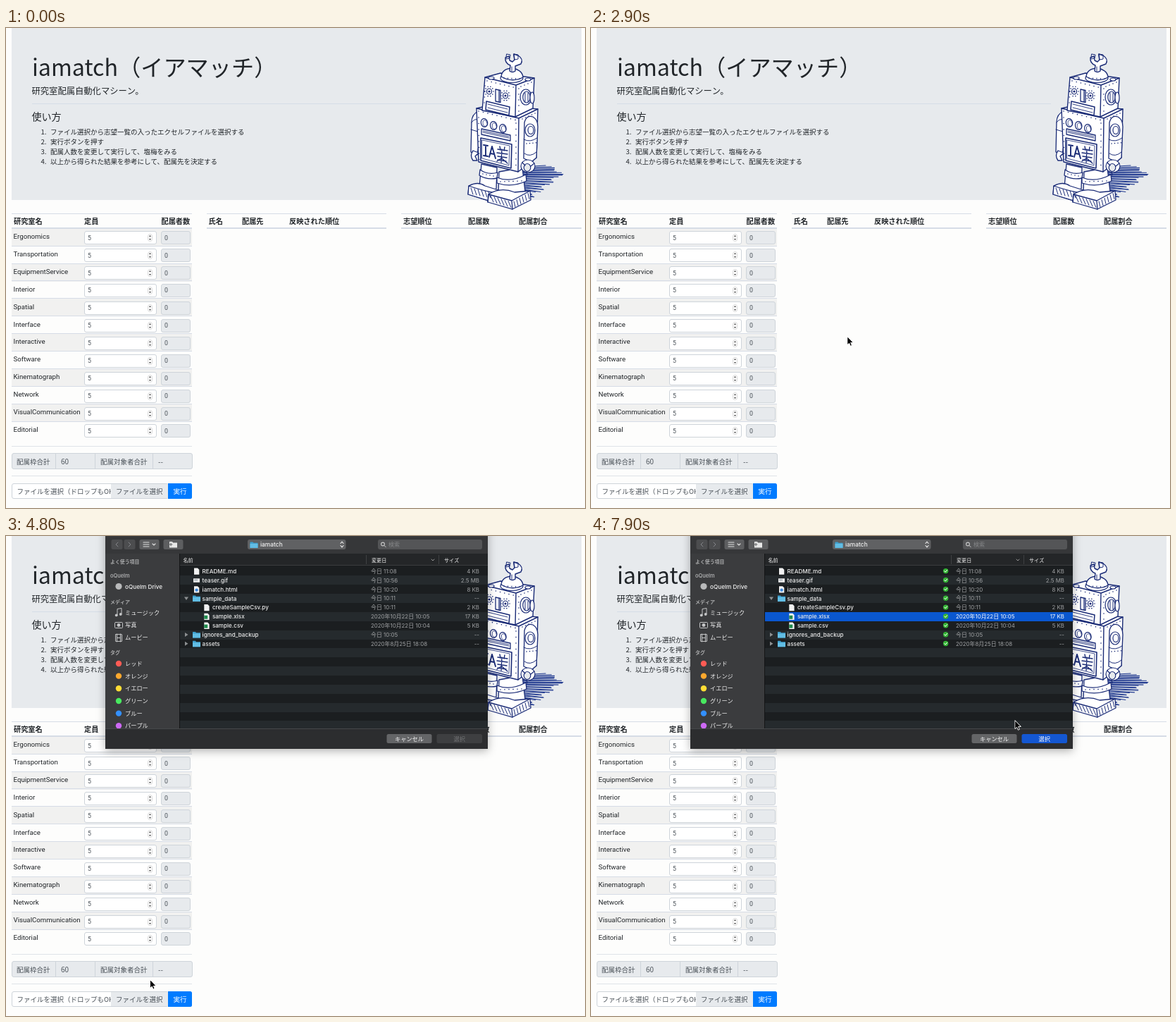
An HTML page with a canvas that plays this animation: 822x681 px, repeating every 8000 ms.

```html
<!DOCTYPE html>
<html lang="ja">
<head>
<meta charset="utf-8">
<title>iamatch</title>
<style>
html, body { margin: 0; width: 100%; height: 100%; overflow: hidden; background: #fdfdfc; }
canvas { display: block; }
</style>
</head>
<body>
<canvas id="stage" width="822" height="681"></canvas>
<script>
const ctx = document.getElementById('stage').getContext('2d');
const LOOP = 8000, STEP = 100;
const JP = '"Noto Sans CJK JP", "Noto Sans CJK", sans-serif';
const LATIN = 'Roboto, "Noto Sans CJK JP", "Noto Sans CJK", sans-serif';
const MAC = 'Inter, "Noto Sans CJK JP", "Noto Sans CJK", sans-serif';
const INK = '#212529', BORDER = '#ced4da', GRAY = '#e7eaed', RULE = '#d6dce6', NAVY = '#1a2b76';

const smooth = u => { u = Math.max(0, Math.min(1, u)); return u * u * (3 - 2 * u); };

function rect(x, y, w, h, fill) {
  ctx.fillStyle = fill;
  ctx.fillRect(x, y, w, h);
}

function box(x, y, w, h, r, fill, line) {
  ctx.beginPath();
  ctx.roundRect(x, y, w, h, r);
  if (fill) { ctx.fillStyle = fill; ctx.fill(); }
  if (line) { ctx.strokeStyle = line; ctx.lineWidth = 1; ctx.stroke(); }
}

function disc(x, y, r, fill) {
  ctx.beginPath();
  ctx.arc(x, y, r, 0, 7);
  ctx.fillStyle = fill;
  ctx.fill();
}

function draw(d, fill, line, width = 1) {
  const p = new Path2D(d);
  if (fill) { ctx.fillStyle = fill; ctx.fill(p); }
  if (line) { ctx.strokeStyle = line; ctx.lineWidth = width; ctx.stroke(p); }
}

// cy is the optical middle of the line
function text(s, x, cy, size, { font = JP, weight = 400, color = INK, align = 'left' } = {}) {
  ctx.font = `${weight} ${size}px ${font}`;
  ctx.fillStyle = color;
  ctx.textAlign = align;
  ctx.fillText(s, x, cy + size * 0.37);
}

/* ---------- page ---------- */

const labs = ['Ergonomics', 'Transportation', 'EquipmentService', 'Interior', 'Spatial', 'Interface',
  'Interactive', 'Software', 'Kinematograph', 'Network', 'VisualCommunication', 'Editorial'];
const steps = ['ファイル選択から志望一覧の入ったエクセルファイルを選択する', '実行ボタンを押す',
  '配属人数を変更して実行して、塩梅をみる', '以上から得られた結果を参考にして、配属先を決定する'];

function intro() {
  rect(8, 0, 809, 244, GRAY);
  text('iamatch（イアマッチ）', 37, 56.5, 32.2);
  text('研究室配属自動化マシーン。', 36.5, 89, 12.3);
  rect(37, 107, 616, 1, '#d5dde6');
  text('使い方', 36.5, 126.2, 14);
  steps.forEach((s, i) => {
    const y = 147 + i * 14.2;
    text(i + 1 + '.', 57.5, y, 9.5, { align: 'right' });
    text(s, 63, y, 9.5);
  });
}

function tableHead(x, w, cells) {
  rect(x, 263, w, 1, RULE);
  rect(x, 283, w, 2, RULE);
  for (const [s, cx] of cells) text(s, cx, 274, 10.2, { weight: 700 });
}

function labTable() {
  tableHead(8, 256, [['研究室名', 11], ['定員', 111], ['配属者数', 220.5]]);
  labs.forEach((name, i) => {
    const y = 284.7 + i * 24.93, mid = y + 12.5;
    if (i % 2 === 0) rect(8, Math.round(y), 256, 25, '#f1f1f0');
    if (i) rect(8, Math.round(y - 1), 256, 1, RULE);
    text(name, 10.5, mid - 1.9, 9.7, { font: LATIN });
    const top = Math.round(mid - 9) + 0.5;
    box(111.5, top, 102, 18, 2.5, '#fff', BORDER);
    text('5', 116, mid + 0.2, 8.8, { font: LATIN, color: '#495057' });
    box(201.5, top + 4, 6, 10, 3, '#fff', '#d8d8d8');
    draw(`M202.8 ${top + 7.6}l1.7 -2 1.7 2zM202.8 ${top + 10.4}l1.7 2 1.7 -2z`, '#555');
    box(220.5, top, 41, 18, 2.5, GRAY, BORDER);
    text('0', 225, mid + 0.2, 8.8, { font: LATIN, color: '#495057' });
  });
}

function controls() {
  rect(8, 593, 256, 1, '#dfe3e8');
  rect(8, 635, 256, 1, '#dfe3e8');
  box(8.5, 603.5, 256, 22, 2.5, GRAY, BORDER);
  for (const x of [70, 126, 208]) rect(x, 604, 1, 22, BORDER);
  const soft = { color: '#495057' };
  text('配属枠合計', 15, 615, 9.5, soft);
  text('60', 78, 615, 10, soft);
  text('配属対象者合計', 134, 615, 9.5, soft);
  text('--', 216, 615, 10, soft);

  box(8.5, 646.5, 222, 21, 2.5, '#fff', BORDER);
  ctx.save();
  ctx.beginPath();
  ctx.rect(8, 640, 140.5, 34);
  ctx.clip();
  text('ファイルを選択（ドロップもOK）', 15.5, 657, 9.5, soft);
  ctx.restore();
  rect(149, 647, 81, 20, GRAY);
  text('ファイルを選択', 156, 657, 9.5, soft);
  box(230, 646, 34, 22, [0, 2.5, 2.5, 0], '#007bff');
  text('実行', 237.5, 657, 9.5, { color: '#fff', weight: 500 });
}

/* ---------- robot ---------- */

function oval(x, y, rx, ry, fill = '#fff', tilt = 0, width = 1.2) {
  ctx.beginPath();
  ctx.ellipse(x, y, rx, ry, tilt, 0, 7);
  if (fill) { ctx.fillStyle = fill; ctx.fill(); }
  ctx.strokeStyle = NAVY;
  ctx.lineWidth = width;
  ctx.stroke();
}

function part(d, width = 1.3, fill = '#fff') { draw(d, fill, NAVY, width); }

function rivets(x, y, dx, dy, n) {
  for (let i = 0; i < n; i++) disc(x + dx * i, y + dy * i, 0.8, NAVY);
}

function shadow() {
  ctx.strokeStyle = '#20398f';
  ctx.lineWidth = 1.1;
  for (let i = 0; i < 27; i++) {
    const y = 193 + i * 1.75, u = i / 26;
    const jitter = Math.sin(i * 7.3) * 5;
    const end = i < 6 ? 766 + i * 4 : 790 - (u - 0.22) * 58;
    ctx.beginPath();
    ctx.moveTo(730, y + 4 - u * 7);
    ctx.lineTo(end + jitter, y + 2 + Math.sin(i * 3.1));
    ctx.stroke();
  }
}

function robot() {
  ctx.lineJoin = ctx.lineCap = 'round';
  shadow();

  // legs and feet
  part('M675 193L672 226Q682 233 696 228L697 198Z');
  part('M673 201Q684 209 698 205L697 213Q683 216 672 209Z');
  part('M700 204L699 234Q715 242 737 232L733 198Z');
  part('M697 212Q715 220 738 208L739 217Q718 227 697 220Z');
  rivets(677, 207, 5, 1, 4);
  rivets(702, 218, 6, -0.2, 6);
  part('M657 224Q670 217 680 224L702 231L694 246L684 245L656 236Z');
  part('M656 236L657 224Q674 230 694 234L692 247Z');
  part('M685 236Q702 225 722 233L744 231L745 244L719 257L684 247Z');
  part('M684 247L685 236L718 245L744 231M718 245L719 257', 1.3, null);
  for (let i = 0; i < 6; i++) {
    part(`M${660 + i * 5} ${227 + i}l3 9`, 1, null);
    part(`M${688 + i * 5} ${238 + i * 1.5}l4 9`, 1, null);
    part(`M${721 + i * 4} ${246 - i * 2.3}l2 8`, 1, null);
  }

  // left arm
  part('M671 118Q661 122 661 134L660 176L669 180L672 160Z');
  part('M660 144L670 147M661 134Q665 128 671 130', 1, null);
  part('M663 174Q658 181 663 188L669 188L666 182L671 177Z');

  // body
  part('M668 114L690 109L755 115L753 184L727 204L671 190Z', 1.4);
  part('M668 114L728 128L755 115M728 128L727 204', 1.4, null);
  rivets(671, 118, 6.5, 1.55, 9);
  rivets(671, 127, 0.1, 8.5, 8);
  rivets(724, 135, 0, 8.5, 8);
  rivets(733, 129, 4.5, -2, 5);
  for (let i = 0; i < 3; i++) {
    oval(679 + i * 13.2, 134.5 + i * 4, 4.7, 6, '#fff', -0.2);
    oval(680 + i * 13.2, 135 + i * 4, 3, 4.4, null, -0.2, 0.8);
  }
  part('M675 143L716 152L716 160L675 151Z');
  part('M677 146L714 154M677 148L714 156', 0.9, null);
  part('M674 156L718 165L717 199L674 188Z', 1.6);
  part('M676 159L715 167L714 195L676 185Z', 0.8, null);
  // hand lettering on the plate
  part('M678 166l6 1M681 167v14M678 181l6 1M686 183l4 -15 5 17M688 178l5 1', 1.9, null);
  part('M698 172l14 2M701 168l1 5M708 169l-1 5M697 177l15 2M698 182l13 2M704 172l-1 19M703 185l-6 4M704 185l8 7M698 187l12 2', 1.4, null);

  // right arm
  part('M736 134Q739 123 748 126Q755 130 755 140L753 184L746 190L735 185Z');
  oval(744, 145, 7, 9);
  oval(745, 145, 4, 5.5);
  part('M735 158Q744 163 754 156M736 178Q744 184 753 176', 1, null);
  rivets(739, 164, 4.5, -0.4, 4);
  oval(741, 196, 10, 9);
  oval(740, 198, 4.8, 5.5, GRAY);
  part('M733 191l4 4M750 192l-5 4M739 204l1 5', 1.2, null);

  // head
  part('M680 70L702 64L750 71L748 114L723 126L676 117Z', 1.4);
  part('M680 70L724 81L750 71M724 81L723 126', 1.4, null);
  rivets(683, 75, 6.2, 1.5, 7);
  rivets(680, 82, -0.3, 8, 4);
  rivets(728, 86, 0, 8, 5);
  rivets(731, 83, 5, -2, 4);
  for (const [x, y] of [[686, 90], [709, 96]]) {
    oval(x, y, 3.5, 4);
    disc(x, y, 1.6, NAVY);
    for (let a = 0; a < 6.2; a += Math.PI / 5)
      disc(x + 6 * Math.cos(a), y + 7 * Math.sin(a), 0.8, NAVY);
  }
  part('M695 87l7 1.5v17l-7 -1.5zM700 89v15');
  part('M682 104L715 112L714 124L681 116Z', 1.5);
  part('M684 108L712 115M684 113L712 120', 0.9, null);
  oval(738, 98, 8, 11);
  oval(739, 98, 5.2, 8);
  part('M737 92v12M741 92v12', 1, null);
  oval(747, 99, 3, 8);

  // aerial
  oval(718, 71, 16, 6.5);
  part('M703 69Q704 58 718 57Q733 59 734 70Q719 78 703 69Z');
  rivets(707, 71, 5.5, 0.3, 5);
  oval(689, 71, 4, 2);
  oval(741, 73, 4, 2);
  part('M715 61L716 53Q708 50 709 42L714 40L715 46L719 48L722 45L721 37L727 39Q735 44 731 51L723 54L723 61Q719 64 715 61Z', 1.4);
  part('M711 37l5 1 -1 5 -5 1zM721 37l6 1 0 6 -5 1zM718 55v6', 1, null);
}

/* ---------- file sheet ---------- */

const ROW = 12.87;
const files = [
  ['README.md', '今日 11:08', '4 KB', 'doc', 0], ['teaser.gif', '今日 10:56', '2.5 MB', 'pic', 0],
  ['iamatch.html', '今日 10:20', '8 KB', 'web', 0], ['sample_data', '今日 10:11', '--', 'open', 0],
  ['createSampleCsv.py', '今日 10:11', '2 KB', 'doc', 1], ['sample.xlsx', '2020年10月22日 10:05', '17 KB', 'sheet', 1],
  ['sample.csv', '2020年10月22日 10:04', '5 KB', 'sheet', 1], ['ignores_and_backup', '今日 10:05', '--', 'dir', 0],
  ['assets', '2020年8月25日 18:08', '--', 'dir', 0]];
const tags = [['レッド', '#ff5b54'], ['オレンジ', '#ffa92e'], ['イエロー', '#ffdd35'],
  ['グリーン', '#48e95f'], ['ブルー', '#3390ff'], ['パープル', '#cd69f5']];
const mac = (color, extra) => ({ font: MAC, weight: 500, color, ...extra });

function folder(x, y) {
  draw(`M${x} ${y - 4}h4l1 1.3h6v7.2h-11z`, '#3d9fcd');
  rect(x, y - 1.6, 11, 6, '#62bde4');
}

function icon(kind, x, y) {
  if (kind === 'dir' || kind === 'open') {
    folder(x - 1, y);
    draw(kind === 'open' ? `M253 ${y - 2}h6l-3 4.5z` : `M254 ${y - 3}v6l4.5 -3z`, '#8d9092');
  } else if (kind === 'pic') {
    rect(x, y - 2.5, 9, 5.5, '#eee');
    rect(x + 1, y - 1.3, 5, 2, '#aeb7bd');
  } else {
    draw(`M${x + 1} ${y - 4.5}h5l2.3 2.3v7h-7.3z`, '#f2f2f2');
    if (kind === 'sheet') rect(x + 1, y - 1.5, 5, 5, '#1f8a4c');
    if (kind === 'web') disc(x + 4.6, y + 1, 2.2, '#3c86d8');
  }
}

function sidebar(glow) {
  rect(141, 25, 106, 248, '#3b3c3e');
  ctx.save();
  ctx.beginPath();
  ctx.rect(141, 25, 106, 248);
  ctx.clip();
  ctx.globalAlpha = glow;
  const head = mac('#a9aaab', { weight: 600 }), item = mac('#f0f0f0');
  text('よく使う項目', 148, 36, 6.9, head);
  text('oQuelm', 148, 56.5, 7.4, head);
  disc(160, 71.5, 4.6, '#b9babb');
  text('oQuelm Drive', 169, 71.5, 8.2, item);
  text('メディア', 148, 93, 7, head);
  text('ミュージック', 169, 108.5, 8.2, item);
  draw('M158 112.5v-9l6 -1v8.5', null, '#c4c5c6');
  disc(156.7, 112.4, 1.9, '#c4c5c6');
  disc(162.7, 111, 1.9, '#c4c5c6');
  text('写真', 169, 126.3, 8.2, item);
  box(154.5, 122.5, 11, 8, 1, null, '#c4c5c6');
  disc(160, 126.5, 2.4, '#c4c5c6');
  text('ムービー', 169, 144, 8.2, item);
  box(155.5, 139.5, 9, 10, 0.5, null, '#c4c5c6');
  draw('M157.5 139v11M162.5 139v11M157.5 144.5h5', null, '#c4c5c6');
  text('タグ', 148, 165, 7, head);
  tags.forEach(([name, color], i) => {
    const y = 181 + i * 17.65;
    disc(160, y, 4.2, color);
    text(name, 169, y, 8.2, item);
  });
  ctx.restore();
}

function toolbar() {
  rect(141, -302, 543, 327, '#363739');
  for (const [x, w] of [[149.5, 16], [167.5, 16], [189.5, 28], [223.5, 28]])
    box(x, 5, w, 14, 2.5, x < 180 ? '#4c4d4f' : '#5d5e60');
  draw('M159 9l-3 3 3 3M174 9l3 3 -3 3', null, '#85868a');
  draw('M195 9h8M195 12h8M195 15h8M208 11l2 2 2 -2', null, '#e2e2e2', 1.1);
  draw('M232 8h4l1 1.5h6v7h-11z', '#e8e8e8');
  draw('M234 10v4M232 12h4', null, '#5d5e60');
  box(343, 5, 139.5, 14, 3, '#606163');
  folder(346.5, 12.5);
  text('iamatch', 361, 12.2, 8.4, mac('#f2f2f2'));
  draw('M475 10.5l2 -2.3 2 2.3M475 13.5l2 2.3 2 -2.3', null, '#eee', 1.1);
  box(528, 5, 148, 14, 3, '#545557');
  ctx.beginPath();
  ctx.arc(535, 11.5, 2.4, 0, 7);
  ctx.strokeStyle = '#c8c8c8';
  ctx.stroke();
  draw('M537 13.5l2.3 2.3', null, '#c8c8c8');
  text('検索', 543, 12.2, 8, mac('#87888a', { weight: 400 }));
}

function listing(t) {
  const rowTop = i => Math.round(43.6 + i * ROW);
  const band = (i, fill) => rect(247, rowTop(i), 437, rowTop(i + 1) - rowTop(i), fill);
  rect(247, 25, 437, 249, '#1b1e20');
  for (let i = 1; i < 18; i += 2) band(i, '#252a2d');
  rect(247, 25, 437, 17, '#242628');
  rect(247, 41, 437, 1, '#3b3d3f');
  rect(511, 27, 1, 13, '#3f4143');
  rect(614, 27, 1, 13, '#3f4143');
  for (const [s, x] of [['名前', 251.5], ['変更日', 519], ['サイズ', 622]])
    text(s, x, 34, 7.1, mac('#f2f2f2'));
  draw('M604 33l2 2 2 -2', null, '#999');
  files.forEach(([name, date, size, kind, depth], i) => {
    const y = 49.9 + i * ROW, x = 266 + depth * 14.3;
    const picked = i === 5 && t >= 6500;
    if (picked) band(i, '#0a57cf');
    icon(kind, x, y);
    const meta = mac(picked ? '#fff' : '#a0a2a4', { weight: 400 });
    text(name, x + 12.6, y, 8.1, mac('#ececec'));
    text(date, 518, y, 7.9, meta);
    text(size, 672, y, 7.9, { ...meta, align: 'right' });
    if (t >= 6900) {
      disc(503.6, y - 0.3, 3.7, '#35b436');
      draw(`M501.8 ${y - 0.3}l1.4 1.5 2.4 -2.8`, null, '#fff');
    }
  });
}

function sheet(t) {
  if (t <= 4500) return;
  const shift = Math.round(302 * (smooth((t - 4500) / 228) - 1));
  ctx.save();
  ctx.translate(0, shift);
  ctx.save();
  ctx.shadowColor = 'rgba(0,0,0,.3)';
  ctx.shadowBlur = 12;
  ctx.shadowOffsetY = 3;
  rect(141, -302, 543, 604, '#2c2d2f');
  ctx.restore();
  toolbar();
  sidebar(t < 4700 ? 0.6 : 1);
  listing(t);
  rect(246, 25, 1, 249, '#151617');
  rect(141, 273, 543, 29, '#2c2d2f');
  rect(141, 273, 543, 1, '#46484a');
  box(540.5, 281, 64, 13, 2.5, '#646567');
  text('キャンセル', 572.5, 287.5, 8.2, mac('#f4f4f4', { align: 'center' }));
  const ready = t >= 6700;
  box(611.5, 281, 64.5, 13, 2.5, ready ? '#1457d2' : '#3e3f41');
  text('選択', 643.8, 287.5, 8.2, mac(ready ? '#fff' : '#737476', { align: 'center' }));
  ctx.restore();
}

/* ---------- pointer ---------- */

const track = [[2600, 374, 430], [2900, 364, 438], [3300, 364, 438], [4200, 193, 651], [4700, 193, 651],
  [5200, 305, 448], [6200, 313, 117], [6800, 313, 117], [7900, 602, 262]];

function pointer(t) {
  if (t < track[0][0]) return;
  const k = Math.max(1, track.findIndex(p => p[0] >= t));
  const [t0, x0, y0] = track[k - 1], [t1, x1, y1] = track[k];
  const u = smooth((t - t0) / (t1 - t0));
  ctx.save();
  ctx.translate(x0 + (x1 - x0) * u, y0 + (y1 - y0) * u);
  draw('M0 0V11.5L2.6 9.1L4.4 13.2L6.3 12.4L4.5 8.4H8Z', '#000', '#fff', 1);
  draw('M.5 1.2V10.3L2.8 8.2L4.7 12.3L5.6 11.9L3.8 7.8H7Z', '#000');
  ctx.restore();
}

function frame() {
  const t = Math.floor((performance.now() % LOOP + 4) / STEP) * STEP % LOOP;
  rect(0, 0, 822, 681, '#fdfdfc');
  intro();
  labTable();
  tableHead(285, 255, [['氏名', 287.5], ['配属先', 335], ['反映された順位', 402]]);
  tableHead(561, 256, [['志望順位', 564], ['配属数', 656], ['配属割合', 728]]);
  controls();
  robot();
  sheet(t);
  pointer(t);
  requestAnimationFrame(frame);
}
frame();
</script>
</body>
</html>
```
